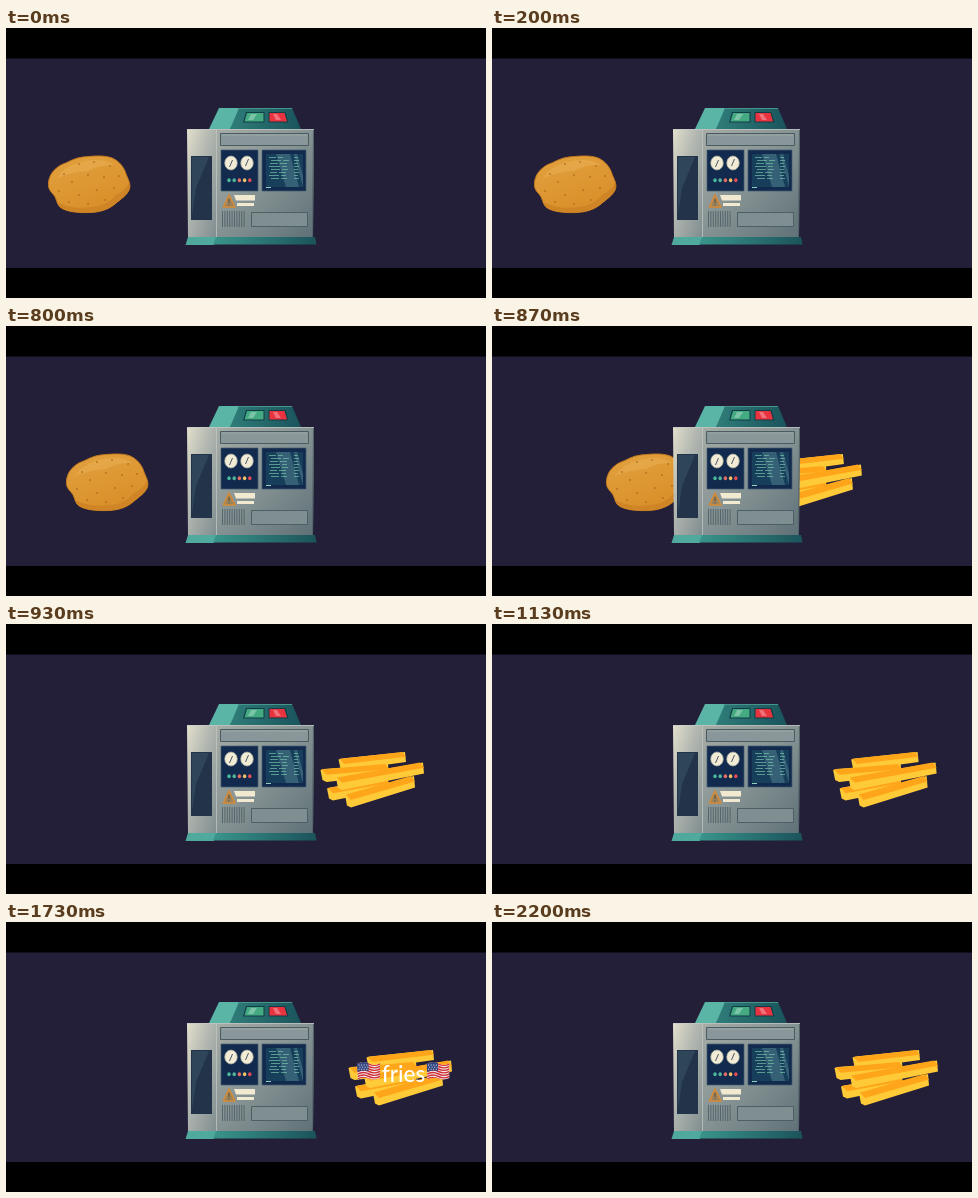
These frames come from a looping animation (480 by 270 pixels, 2470 ms). An HTML page:

```html
<!DOCTYPE html>
<html lang="en">
<head>
<meta charset="utf-8">
<title>Fries machine</title>
<style>
html, body { margin: 0; height: 100%; overflow: hidden; background: #000; }
svg { display: block; width: 100vw; height: 100vh; }
text { font: 500 22.5px Lato, "Open Sans", sans-serif; fill: #fff; text-anchor: middle; }
</style>
</head>
<body>
<svg viewBox="0 0 480 270">
<defs>
  <linearGradient id="side" x2="1" y2="1">
    <stop stop-color="#e3dfcc"/><stop offset=".4" stop-color="#b3b8b1"/><stop offset="1" stop-color="#7f8c8f"/>
  </linearGradient>
  <linearGradient id="front" x2="1" y2="1">
    <stop stop-color="#a7aca6"/><stop offset=".5" stop-color="#859293"/><stop offset="1" stop-color="#5f7177"/>
  </linearGradient>
  <linearGradient id="hood">
    <stop stop-color="#2f7d79"/><stop offset="1" stop-color="#1a545c"/>
  </linearGradient>
  <linearGradient id="base">
    <stop stop-color="#3a958c"/><stop offset="1" stop-color="#1b535b"/>
  </linearGradient>
  <linearGradient id="skin" x2=".5" y2="1">
    <stop stop-color="#e2a23f"/><stop offset="1" stop-color="#d98f2a"/>
  </linearGradient>
  <clipPath id="wave"><path d="M0 2Q6-1.5 12 1.5T23 1V16Q18 18.5 12 16.5T1 17.5Z"/></clipPath>
  <g id="flag" clip-path="url(#wave)">
    <path fill="#f3eeee" d="M0-2H24V20H0Z"/>
    <g id="stripes" fill="none" stroke="#cf3038" stroke-width="1.4"></g>
    <path fill="#34467f" d="M0-2H11.5V9Q6 7.5 0 10Z"/>
    <path stroke="#dfe3f0" stroke-dasharray="1 1.6" d="M1.5 3H11M2.5 5.2H11M1.5 7.3H11"/>
  </g>
</defs>

<path fill="#231f39" d="M0 30.500H480V240H0Z"/>

<g id="potato">
  <path fill="url(#skin)" stroke="#c47b20" d="M42.500 155C43 147 48 141 55 137C63 134 68 130 77 129C88 128 98 127 106 130C113 133 118 139 120 146C122 151 125 156 123.500 161C121 168 114 171 109 176C103 181 95 184 85 184.500C73 185 60 184 54 179C50 175 51 170 47 166C44 163 42 160 42.500 155Z"/>
  <path fill="#cf8526" d="M123 155Q119 163 110 167Q101 178 86 179Q67 182 51 174Q53 184 77 184.500Q99 185 109 176Q119 169 123 162Z"/>
  <path fill="#e9b052" opacity=".55" d="M51 150Q57 139 75 134Q96 129 109 137Q94 136 82 143Q65 144 51 150Z"/>
  <g id="spots" fill="#a9651b"></g>
</g>

<g id="fries">
  <g id="sticks"></g>
  <g id="label">
    <use href="#flag" x="351" y="140"/>
    <use href="#flag" x="420.500" y="140"/>
    <text x="397.500" y="160">fries</text>
  </g>
</g>

<g id="machine">
  <path fill="url(#hood)" d="M224 101L230 80H286L295 101Z"/>
  <path fill="#5bb5a6" d="M203 101L213 80H233L224 101Z"/>
  <path fill="none" stroke="#45958d" d="M232 80.500H286"/>
  <path fill="#123d47" d="M240 84H258.500V94.500H237ZM262.500 84H279.500L282.500 94.500H262.500Z"/>
  <path fill="#43aa82" d="M241 85H257.500V93.500H238.500Z"/>
  <path fill="#e93440" d="M263.500 85H278.500L281 93.500H263.500Z"/>
  <path fill="#fff" opacity=".3" d="M245 86H251L247 92H242ZM267 86H271L275 92H270Z"/>

  <path fill="url(#side)" d="M181 101H211V209H182Z"/>
  <path fill="url(#front)" d="M210 101H308L307 209H210Z"/>
  <path fill="none" stroke="#c4ccc7" stroke-width=".7" d="M181 101.500H308M210.500 102V209"/>
  <path fill="none" stroke="#526369" d="M307.500 102L306.500 209"/>
  <path fill="#23344a" d="M185 128H206V192H185Z"/>
  <path fill="#2f465a" d="M186 129H203L190 160L186 187Z"/>

  <path fill="#89979a" stroke="#4a5b62" d="M214.500 105.500H302.500V117.500H214.500Z"/>
  <path stroke="#9da9a8" d="M216 107H301"/>

  <path fill="#122a4d" stroke="#415e70" stroke-width=".7" d="M215 122H252V163H215ZM256 122H300V163H256Z"/>
  <g fill="#f2ecd6" stroke="#9ca79b" stroke-width=".7">
    <ellipse cx="225" cy="135" rx="6.300" ry="7"/><ellipse cx="241" cy="135" rx="6.300" ry="7"/>
  </g>
  <path stroke="#4b5660" d="M223.500 139L226.500 132M239.500 138L242.500 131"/>
  <g id="lights"></g>

  <path fill="#173f5c" d="M260 126H297V159H260Z"/>
  <path fill="#456f80" opacity=".7" d="M270 126H284L293 159H280ZM288 126H291L297 148V159Z"/>
  <g id="readout" stroke="#74c1aa" opacity=".7"></g>
  <path stroke="#94cec0" d="M260 159.500H265"/>

  <path fill="#9a8460" stroke="#d58a34" stroke-width="1.600" stroke-linejoin="round" d="M223 167L229 179H217.500Z"/>
  <path stroke="#5d4c33" d="M223 171V175M223 176.300V177.500"/>
  <path fill="#f1ead1" d="M228 167H249V172.500H230ZM231 175H248V178H231Z"/>
  <g id="grill" stroke="#56656c"></g>
  <path fill="#7f8e91" stroke="#4d5f66" d="M245.500 184.500H301.500V198.500H245.500Z"/>

  <path fill="#4fa99c" d="M182 209H211L208 217H179.500Z"/>
  <path fill="url(#base)" d="M210 209H309L310.500 216.500H207Z"/>
</g>
</svg>
<script>
const el = id => document.getElementById(id);
const fill = (id, items, draw) => el(id).innerHTML = items.map(draw).join('');
const range = n => [...Array(n).keys()];

fill('spots', [[58, 146], [73, 136], [88, 134], [104, 138], [66, 154], [82, 147], [98, 149],
  [113, 148], [53, 163], [73, 167], [91, 162], [108, 160], [82, 176], [63, 174], [99, 172]],
  ([x, y]) => `<ellipse cx="${x}" cy="${y}" rx="1" ry=".7"/>`);

fill('lights', ['#48b99b', '#53b69a', '#e76e66', '#efc16b', '#e64c55'],
  (color, i) => `<ellipse cx="${223 + i * 5.2}" cy="152.300" rx="1.700" ry="2" fill="${color}"/>`);

fill('grill', range(10), i => `<path d="M${216.5 + i * 2.4} 183V199"/>`);

fill('readout', range(8), i => {
  const y = 129.5 + i * 3, start = 263 + i * 5 % 3;
  return `<path d="M${start} ${y}h${7 + i * 3 % 5}m2 0h${5 + i % 3}M288 ${y}h${4 + i % 2}"/>`;
});

fill('stripes', range(7), i =>
  `<path d="M0 ${2.3 + i * 2.5}Q6 ${-1 + i * 2.5} 12 ${2 + i * 2.5}T24 ${1.3 + i * 2.5}"/>`);

// Top edge of a stick from left to right, and its height: yellow body, orange upper face
const stick = ([x1, y1, x2, y2, h]) => `
  <path fill="#ffca38" d="M${x1} ${y1 + 1}L${x1 + 3} ${y1}L${x2} ${y2}L${x2 + 1} ${y2 + h - 2}L${x1 + 6} ${y1 + h}L${x1 + 2} ${y1 + h - 2}Z"/>
  <path fill="#ffa51a" d="M${x1 + 1} ${y1 + .5}L${x2 - 3} ${y2}L${x2 + 1} ${y2 + h * .4}L${x1 + 6} ${y1 + h * .45}Z"/>`;
fill('sticks', [[360.5, 134.5, 427, 128, 12], [342.5, 145, 410, 140, 13],
  [349, 163.5, 410, 154, 13], [367, 170, 436, 152, 13.5], [358, 153, 445, 138.5, 13]], stick);

const LOOP = 2470, FPS = 15;
const place = (id, x, visible) => {
  el(id).setAttribute('transform', `translate(${x.toFixed(2)})`);
  el(id).style.display = visible ? '' : 'none';
};

function render(now) {
  const step = Math.floor((now % LOOP + 4) * FPS / 1000);
  place('potato', 18 * Math.max(0, step - 11) ** 2, step < 14);
  place('fries', -28 * Math.exp(14 - step), step > 12);
  el('label').style.display = step >= 21 && step < 28 ? '' : 'none';
}

const begin = performance.now();
function tick() {
  render(performance.now() - begin);
  requestAnimationFrame(tick);
}
tick();
</script>
</body>
</html>
```
